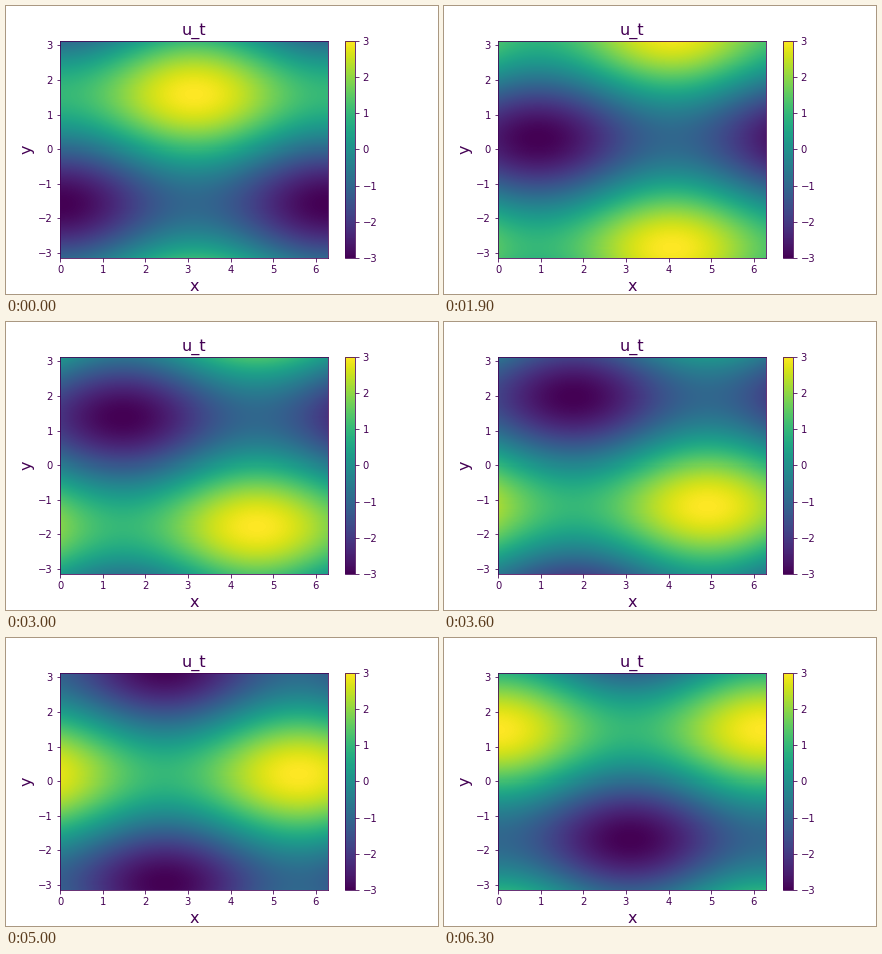
Write a matplotlib script that moves like this. It is 432x288 px and loops after 6.4 s.

```python
import numpy as np
import matplotlib.pyplot as plt
from matplotlib.animation import FuncAnimation

FRAMES = 64
INTERVAL = 100  # ms
INK = "#440154"

plt.rcParams.update({
    "font.family": "DejaVu Sans",
    "font.size": 10,
    "text.color": INK,
    "axes.labelcolor": INK,
    "axes.edgecolor": INK,
    "xtick.color": INK,
    "ytick.color": INK,
})

# Sample at cell centres so the image fills the axes exactly
NX, NY = 268, 217
x = (np.arange(NX) + 0.5) / NX * 2 * np.pi
y = (np.arange(NY) + 0.5) / NY * 2 * np.pi - np.pi
X, Y = np.meshgrid(x, y)


def field(t):
    """Two travelling waves, the y wave twice as fast as the x wave."""
    return 2 * np.sin(Y - t) - np.cos(X - t / 2)


fig, ax = plt.subplots(figsize=(6, 4), dpi=72)
fig.subplots_adjust(left=0.125, right=0.9, bottom=0.125, top=0.88)

image = ax.imshow(field(0), cmap="viridis", vmin=-3, vmax=3,
                  origin="lower", aspect="auto", interpolation="nearest",
                  extent=(0, 2 * np.pi, -np.pi, np.pi))
ax.set_xticks(range(7))
ax.set_yticks(range(-3, 4))
ax.set_title("u_t", fontsize=16)
ax.set_xlabel("x", fontsize=16)
ax.set_ylabel("y", fontsize=16)
fig.colorbar(image, ax=ax, ticks=range(-3, 4))


def update(frame):
    image.set_data(field(2 * np.pi * frame / FRAMES))
    return [image]


anim = FuncAnimation(fig, update, frames=FRAMES, interval=INTERVAL,
                     repeat=True, repeat_delay=0)
plt.show()
```
